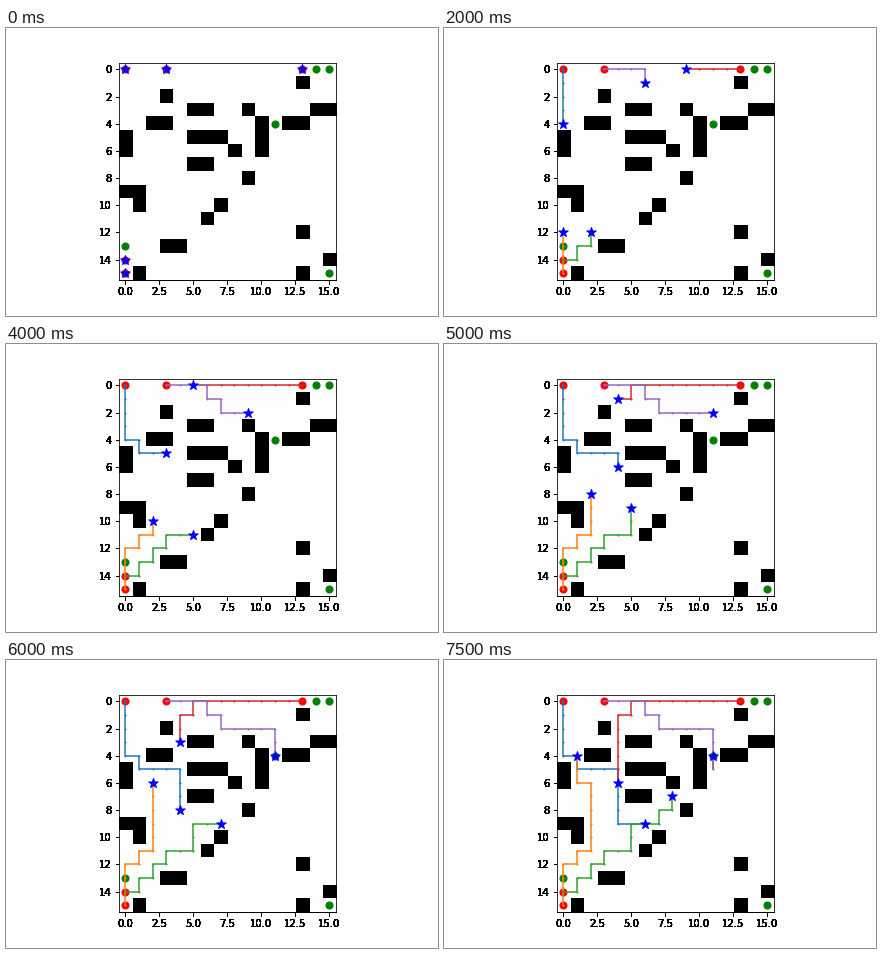
Animation, 432 px wide and 288 px high, one loop 8 s. Source, as a matplotlib script:

```python
import numpy as np
import matplotlib.pyplot as plt
from matplotlib.animation import FuncAnimation
from matplotlib.colors import ListedColormap

SIZE = 16
STEPS = 16

# blocked areas as [rows, columns]
WALLS = np.s_[
    3:9:2, 5:7], np.s_[4:7, 10], np.s_[5:7, 0], np.s_[3:9:5, 9], np.s_[
    4, 2:4], np.s_[4, 12:14], np.s_[3, 14:], np.s_[9, :2], np.s_[
    10, 1], np.s_[13, 3:5], np.s_[12::3, 13], np.s_[1, 13], np.s_[
    2, 3], np.s_[14, 15], np.s_[15, 1]

# key cells (x, y); a repeated cell means waiting one step
ROUTES = [
    [(0, 0), (0, 4), (1, 5), (4, 9), (6, 9)],
    [(0, 15), (0, 15), (0, 12), (1, 11), (2, 6), (1, 4)],
    [(0, 14), (1, 13), (2, 12), (3, 11), (5, 9), (7, 8), (8, 7)],
    [(13, 0), (5, 1), (4, 6)],
    [(3, 0), (6, 1), (7, 2), (11, 4), (11, 4), (11, 5), (11, 4)],
]
GOALS = [(14, 0), (15, 0), (11, 4), (0, 13), (15, 15)]


def build_grid():
    grid = np.zeros((SIZE, SIZE))
    for area in WALLS:
        grid[area] = 1
    for i in range(2):  # two short diagonals
        grid[5 + i, 7 + i] = grid[10 + i, 7 - i] = 1
    return grid


def walk(route):
    """Visit the key cells one cell per step, sideways before up or down."""
    x, y = route[0]
    cells = [(x, y)]
    for goal_x, goal_y in route[1:]:
        if (x, y) == (goal_x, goal_y):
            cells.append((x, y))
        while x != goal_x:
            x += 1 if goal_x > x else -1
            cells.append((x, y))
        while y != goal_y:
            y += 1 if goal_y > y else -1
            cells.append((x, y))
    return np.array(cells)


paths = [walk(route) for route in ROUTES]

fig = plt.figure(figsize=(6, 4), dpi=72, facecolor="white")
fig.subplots_adjust(left=0.125, right=0.9, bottom=0.125, top=0.88)

# stacked copies of the axes give the tick labels their heavy edges
for layer in range(14):
    ax = fig.add_subplot(label=str(layer), facecolor="none", aspect="equal",
                         xlim=(-0.5, SIZE - 0.5), ylim=(SIZE - 0.5, -0.5))

ax.imshow(build_grid(), cmap=ListedColormap(["#fdfdfd", "black"]),
          interpolation="nearest")
ax.scatter(*np.transpose(GOALS), s=50, color="green")
ax.scatter(*np.transpose([path[0] for path in paths]), s=50, color="red")
trails = [ax.plot([], [], "o-", lw=1.5, ms=1)[0] for _ in paths]
stars = ax.scatter([], [], s=100, marker="*", color="blue", zorder=3)


def draw(k):
    for trail, path in zip(trails, paths):
        trail.set_data(*path[:k + 1].T)
    stars.set_offsets([path[k] for path in paths])
    return [*trails, stars]


anim = FuncAnimation(fig, draw, frames=STEPS, interval=500,
                     repeat=True, repeat_delay=0)
plt.show()
```
